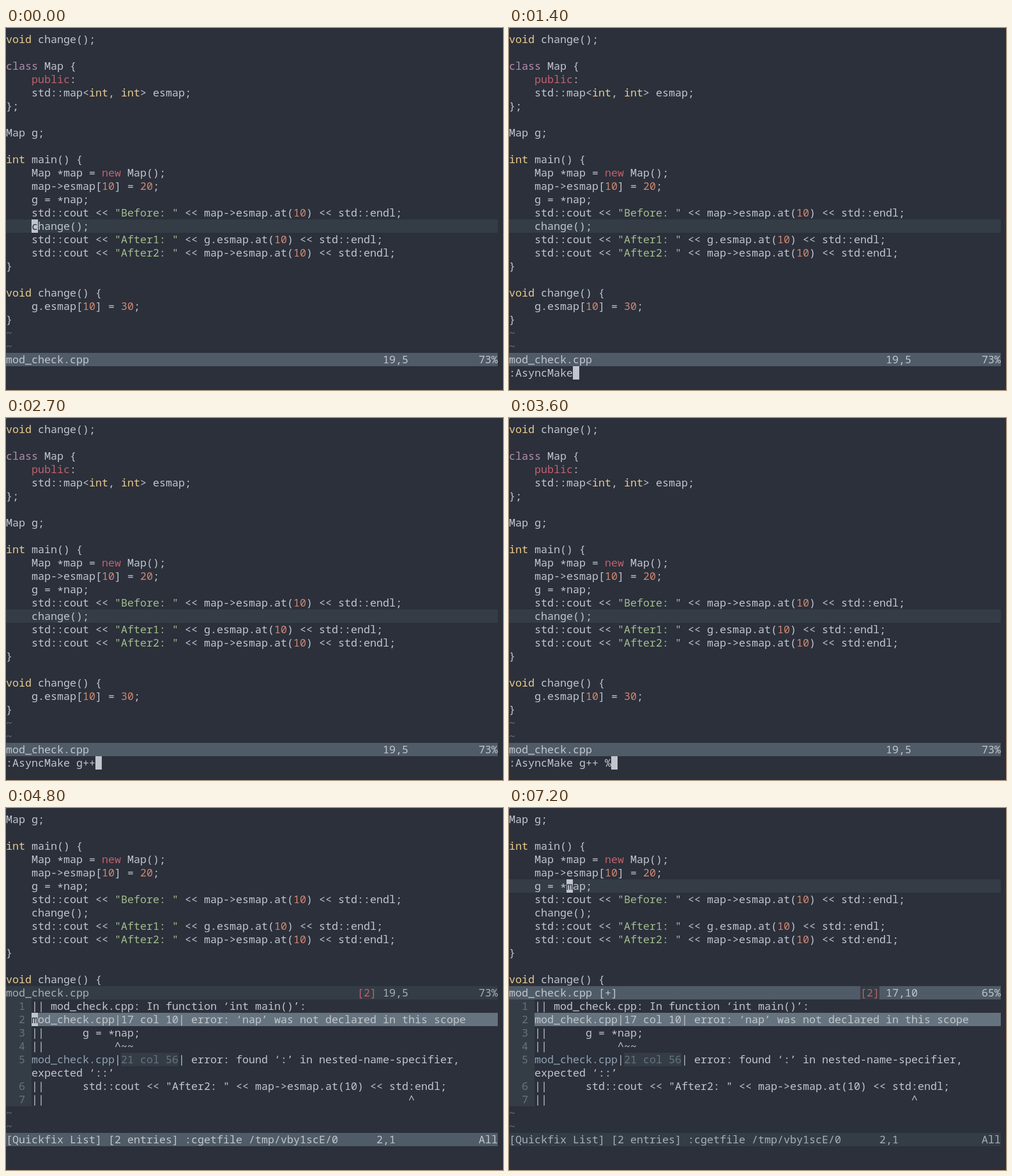
An HTML page with a canvas that plays this animation: 856 by 624 pixels, repeating every 8 s.

```html
<!DOCTYPE html>
<html lang="en">
<head>
<meta charset="utf-8">
<title>Editor session</title>
<style>
  html, body { margin: 0; width: 100%; height: 100%; overflow: hidden; background: #2b303b; }
  canvas { display: block; }
</style>
</head>
<body>
<canvas id="stage" width="856" height="624"></canvas>
<script>
const ctx = document.getElementById('stage').getContext('2d');

const LOOP = 8000;
const CELL = { w: 11, h: 23, top: 8, baseline: 18 };
const COLS = 77;
const C = {
  bg: '#2b303b', line: '#343d46', bar: '#4f5b66', dim: '#65737e', soft: '#a7adba',
  text: '#c0c5ce', red: '#bf616a', orange: '#d08770', yellow: '#ebcb8b',
  green: '#a3be8c', purple: '#b48ead', blue: '#8fa1b3'
};

const SOURCE = `void change();

class Map {
    public:
    std::map<int, int> esmap;
};

Map g;

int main() {
    Map *map = new Map();
    map->esmap[10] = 20;
    g = *nap;
    std::cout << "Before: " << map->esmap.at(10) << std::endl;
    change();
    std::cout << "After1: " << g.esmap.at(10) << std::endl;
    std::cout << "After2: " << map->esmap.at(10) << std:endl;
}

void change() {
    g.esmap[10] = 30;
}`.split('\n');

// Each entry is [line number, text]; a wrapped row has no number.
const QUICKFIX = [
  [1, '|| mod_check.cpp: In function ‘int main()’:'],
  [2, 'mod_check.cpp|17 col 10| error: ‘nap’ was not declared in this scope'],
  [3, '||      g = *nap;'],
  [4, '||' + ' '.repeat(11) + '^~~'],
  [5, 'mod_check.cpp|21 col 56| error: found ‘:’ in nested-name-specifier,'],
  ['', 'expected ‘::’'],
  [6, '||      std::cout << "After2: " << map->esmap.at(10) << std:endl;'],
  [7, '||' + ' '.repeat(57) + '^']
];

const COMMANDS = [
  [700, ':'], [900, ':A'], [1100, ':As'], [1300, ':Asy'], [1400, ':AsyncMake'],
  [2000, ':AsyncMake '], [2200, ':AsyncMake g'], [2600, ':AsyncMake g+'],
  [2700, ':AsyncMake g++'], [3100, ':AsyncMake g++ '], [3600, ':AsyncMake g++ %']
];

const rowTop = row => CELL.top + row * CELL.h;

function fill(col, row, width, color) {
  ctx.fillStyle = color;
  ctx.fillRect(col * CELL.w, rowTop(row), width * CELL.w, CELL.h);
}

function write(text, col, row, color = C.text) {
  ctx.fillStyle = color;
  [...text].forEach((ch, i) => {
    if (ch === ' ') return;
    const drop = ch === '*' ? 3 : 0; // asterisks sit at mid-height
    ctx.fillText(ch, (col + i) * CELL.w, rowTop(row) + CELL.baseline + drop);
  });
}

function tokenColor(token) {
  if (token[0] === '"') return C.green;
  if (/^\d/.test(token)) return C.orange;
  if (token === 'class') return C.purple;
  return /^(void|int)$/.test(token) ? C.yellow : C.red;
}

function writeCode(line, row) {
  const tokens = /"[^"]*"|\b(?:void|int|class|public|new|\d+)\b/g;
  let end = 0;
  for (const { 0: token, index } of line.matchAll(tokens)) {
    write(line.slice(end, index), end, row);
    write(token, index, row, tokenColor(token));
    end = index + token.length;
  }
  write(line.slice(end), end, row);
}

function statusBar(row, active, name, position, positionCol, percent) {
  const color = active ? C.text : C.soft;
  fill(0, row, COLS, active ? C.bar : C.line);
  write(name, 0, row, color);
  write(position, positionCol, row, color);
  write(percent, 74, row, color);
}

function tildes() {
  write('~', 0, 22, C.dim);
  write('~', 0, 23, C.dim);
}

function cursor(col, row, ch = '') {
  fill(col, row, 1, C.text);
  write(ch, col, row, C.bg);
}

function underlineCursor(col, row) {
  ctx.fillStyle = C.text;
  ctx.fillRect(col * CELL.w, rowTop(row + 1) - 5, CELL.w, 5);
}

function drawEditor(t) {
  fill(0, 14, COLS, C.line);
  SOURCE.forEach(writeCode);
  tildes();
  statusBar(24, true, 'mod_check.cpp', '19,5', 59, '73%');

  const typing = t >= 700 && t < 4400;
  if (typing) {
    const command = COMMANDS.filter(([start]) => start <= t).pop()[1];
    write(command, 0, 25);
    cursor(command.length, 25);
  } else {
    if (t >= 4400) write('Running: g++ mod_check.cpp', 0, 25);
    cursor(4, 14, 'c');
  }
}

function drawQuickfix() {
  QUICKFIX.forEach(([number, text], i) => {
    const row = 14 + i;
    fill(0, row, 4, C.line);
    write(String(number), 2, row, C.dim);
    if (number === 2) fill(4, row, COLS - 4, C.dim);
    if (number === 5) {
      fill(18, row, 9, C.line);
      write(text.slice(0, 13), 4, row, C.blue);
      write('|', 17, row);
      write(text.slice(14, 23), 18, row, C.dim);
      write(text.slice(23), 27, row);
    } else {
      write(text, 4, row);
    }
  });
  tildes();
}

function drawSplit(t) {
  const inCode = t >= 5900;
  const replacing = t >= 6900 && t < 7200;
  const fixed = t >= 7200;

  if (inCode) fill(0, 5, COLS, C.line);
  SOURCE.slice(7, 20).forEach((line, row) =>
    writeCode(fixed ? line.replace('nap', 'map') : line, row));

  statusBar(13, inCode, 'mod_check.cpp' + (fixed ? ' [+]' : ''),
    inCode ? '17,10' : '19,5', 59, inCode ? '65%' : '73%');
  fill(55, 13, 3, C.line);
  write('[2]', 55, 13, C.red);

  drawQuickfix();
  statusBar(24, !inCode, '[Quickfix List] [2 entries] :cgetfile /tmp/vby1scE/0', '2,1', 58, 'All');

  if (!inCode) cursor(4, 15, 'm');
  else if (replacing) {
    underlineCursor(9, 5);
    write('r', 66, 25);
  } else cursor(9, 5, fixed ? 'm' : 'n');
}

function draw(now) {
  const t = now % LOOP;
  ctx.fillStyle = C.bg;
  ctx.fillRect(0, 0, 856, 624);
  ctx.font = '18.333px "Noto Sans Mono", "DejaVu Sans Mono", monospace';
  ctx.textBaseline = 'alphabetic';
  if (t < 4800) drawEditor(t);
  else drawSplit(t);
  if (t >= 100) {
    ctx.fillStyle = C.text;
    ctx.fillRect(0, 0, 1, 1);
  }
}

const start = performance.now();
function tick() {
  draw(performance.now() - start);
  requestAnimationFrame(tick);
}
tick();
</script>
</body>
</html>
```
